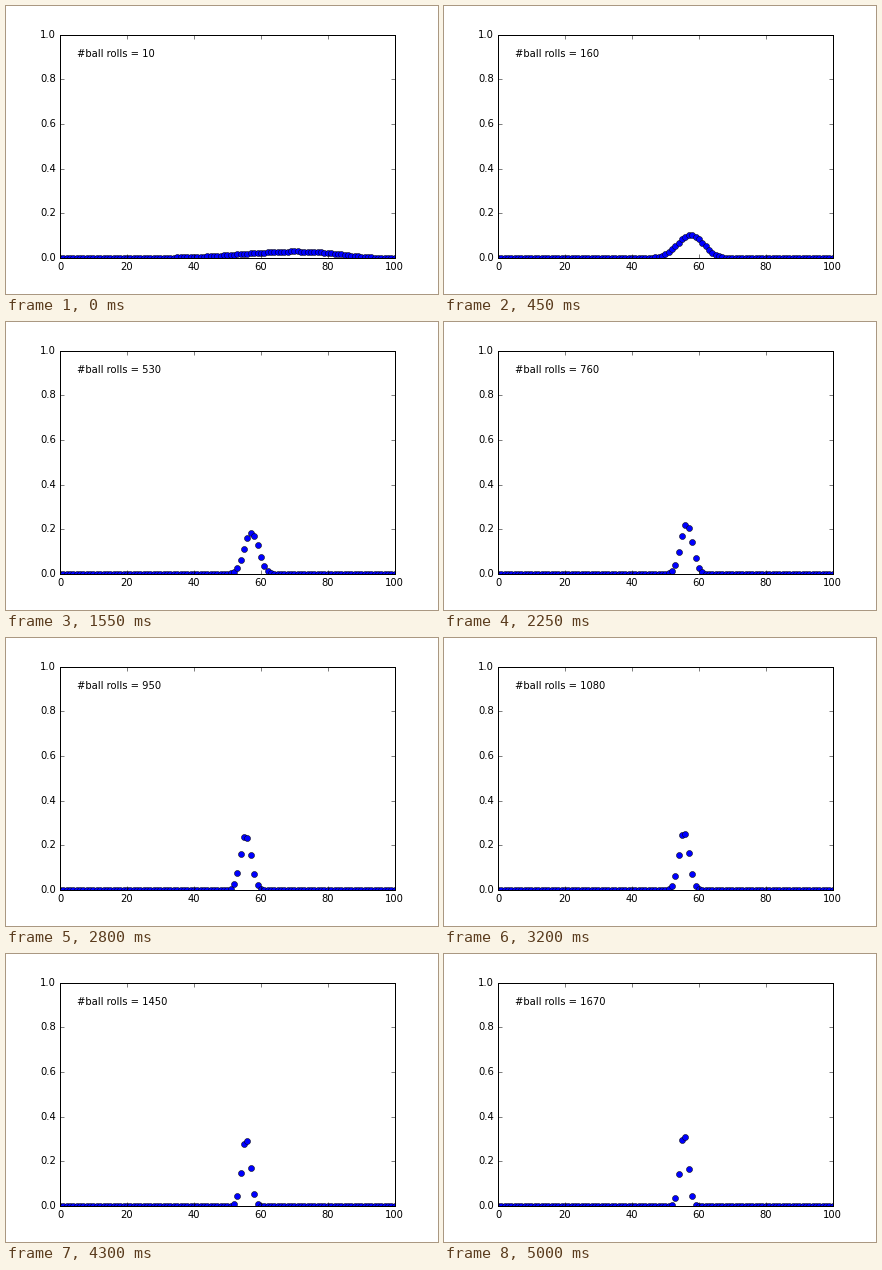
Animation, 432 px wide and 288 px high, one loop 5050 ms. Source, as a matplotlib script:

```python
import matplotlib.pyplot as plt
import numpy as np
from matplotlib.animation import FuncAnimation

plt.style.use("classic")
plt.rcParams.update({
    "font.family": "DejaVu Sans",
    "font.size": 10,
    "xtick.labelsize": 10,
    "ytick.labelsize": 10,
    "savefig.dpi": 72,
    "savefig.facecolor": "white",
})

FRAMES = 101
INTERVAL = 50
LAST_STEP = 166

# Running total of balls that landed on the near side
ROLLS = [0, 10, 310, 530, 760, 950, 1230, 1670]
HITS = [0, 7, 177, 303, 428, 527, 685, 928]

x = np.arange(101)
p = np.clip(x / 100, 1e-12, 1 - 1e-12)


def roll_count(frame):
    """Ten rolls per 30 ms step, sampled every 50 ms."""
    return 10 * (min(-(-5 * frame // 3), LAST_STEP) + 1)


def posterior(n):
    hits = round(float(np.interp(n, ROLLS, HITS)))
    log_like = hits * np.log(p) + (n - hits) * np.log(1 - p)
    weight = np.exp(log_like - log_like.max())
    return weight / weight.sum()


fig = plt.figure(figsize=(6, 4), dpi=72, facecolor="white")
ax = fig.add_axes([0.125, 0.125, 0.775, 0.775])
ax.set_xlim(0, 100)
ax.set_ylim(0, 1)
dots, = ax.plot(x, posterior(10), "bo")
label = ax.text(0.05, 0.9, "", transform=ax.transAxes)


def update(frame):
    n = roll_count(frame)
    dots.set_ydata(posterior(n))
    label.set_text(f"#ball rolls = {n}")
    return dots, label


anim = FuncAnimation(fig, update, frames=FRAMES, interval=INTERVAL,
                     init_func=lambda: update(0), repeat=True,
                     repeat_delay=0, blit=False)
plt.show()
```
